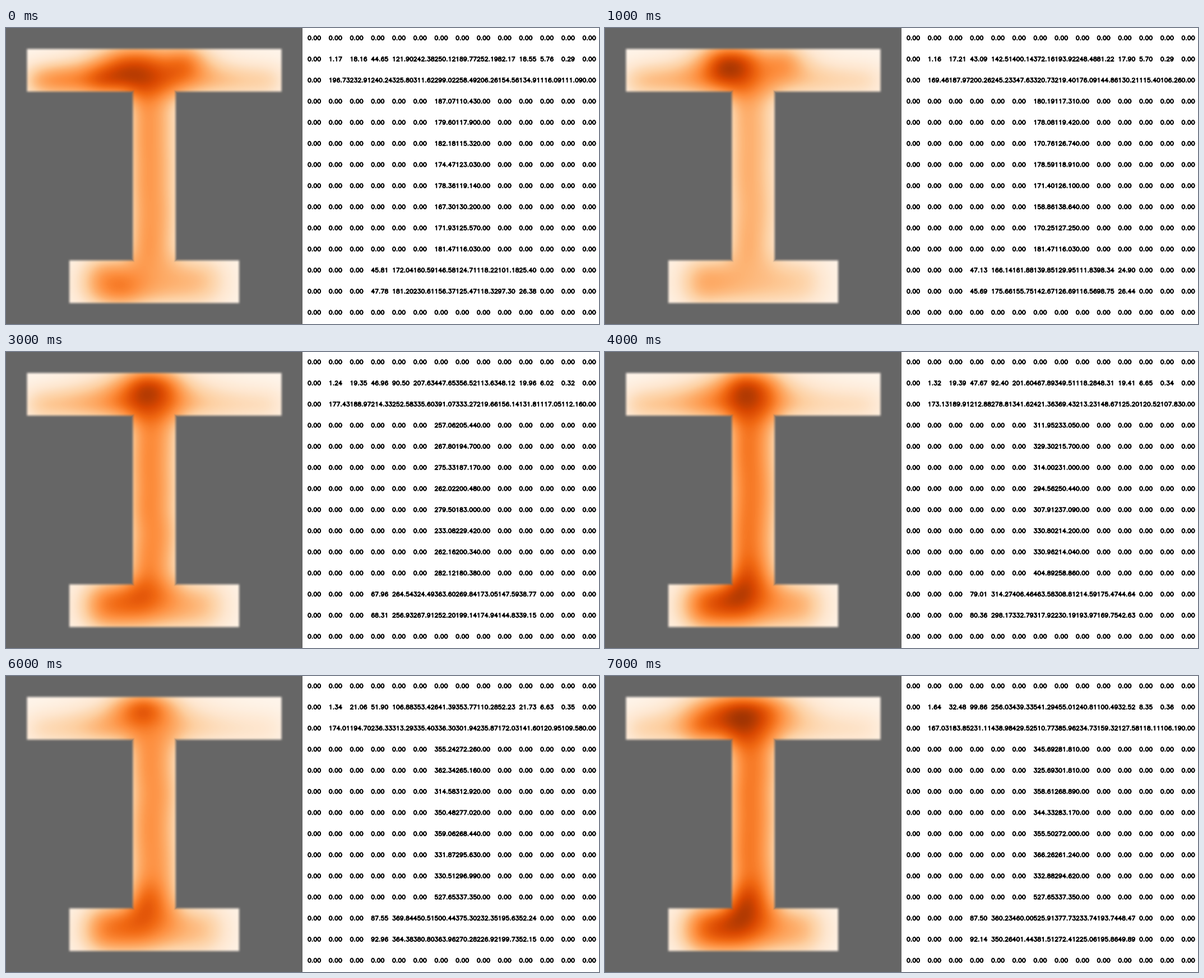
Animation, 1058 px wide and 529 px high, one loop 8000 ms. Source, as a matplotlib script:

```python
import numpy as np
import matplotlib.pyplot as plt
from matplotlib.animation import FuncAnimation
from matplotlib.patches import PathPatch
from matplotlib.path import Path

W, H, DPI = 1058, 529, 100
N = 14
CELL = H / N
STEPS = 8
GLYPH = 0.345              # pixels per glyph unit
TEXT_X, TEXT_Y, PITCH = 538.0, 21.3, 37.73


# ---- Stroke digits on a 20 x 21 unit cell ----

def arc(cx, cy, rx, ry, start, stop, n=15):
    a = np.radians(np.linspace(start, stop, n))
    return list(zip(cx + rx * np.cos(a), cy + ry * np.sin(a)))


SIX = arc(11, 9, 7, 12, 45, 180, 8) + arc(10.5, 6.5, 6.5, 6.5, 180, 540)
STROKES = {
    "0": arc(10, 10.5, 7, 10.5, 0, 360, 19),
    "1": [(6, 17), (8, 18), (11, 21), (11, 0)],
    "2": arc(10, 15, 6, 6, 170, -40) + [(3, 0), (17, 0)],
    "3": [(5, 21), (16, 21), (10, 13)] + arc(10, 6.5, 7, 6.5, 90, -160),
    "4": [(13, 0), (13, 21), (3, 7), (18, 7)],
    "5": [(15, 21), (5, 21), (4, 12)] + arc(10, 7, 7, 7, 140, -155),
    "6": SIX,
    "7": [(3, 21), (17, 21), (7, 0)],
    "8": arc(10, 16.5, 6, 4.5, -90, 270) + arc(10, 6, 7, 6, 90, 450),
    "9": [(20 - x, 21 - y) for x, y in SIX],
    ".": [(5, 0), (5, 2)],
}
GLYPHS = {ch: np.array(pts, float) * (GLYPH, -GLYPH)
          for ch, pts in STROKES.items()}


def grid_path(grid):
    """One path holding every number of the table."""
    verts, codes = [], []
    for (row, col), value in np.ndenumerate(grid):
        x, y = TEXT_X + PITCH * col, TEXT_Y + PITCH * row
        for ch in f"{value:.2f}":
            pts = GLYPHS[ch]
            verts.append(pts + (x, y))
            codes += [Path.MOVETO] + [Path.LINETO] * (len(pts) - 1)
            x += GLYPH * (10 if ch == "." else 20)
    path = Path(np.vstack(verts), codes)
    path.should_simplify = False
    return path


# ---- Forces in the cells of the I section ----

KEY_TIMES = [0, 1, 3, 5, 6, 7]


def key(t, *values):
    return np.interp(t, KEY_TIMES, values)


def bump(cols, center, force, width):
    return force * np.exp(-0.5 * ((cols - center) / width) ** 2)


def section(t):
    """Cell forces at step t: hot spots over a base that grows with load."""
    rng = np.random.default_rng(20 + t)
    load = np.clip((t - 1) / 4, 0, 1)
    early = max(0, 1 - t)
    grid = np.zeros((N, N))

    # Top flange: a crown over the web, with a side spot while load is low
    cols = np.arange(1, 13)
    crown = key(t, 5.4, 5.4, 6.3, 6.3, 6, 6)
    top = bump(cols, 6, 130 + 25 * load, 2)
    top += bump(cols, crown, key(t, 150, 335, 350, 330, 500, 380),
                key(t, 0.9, 0.75, 0.75, 0.75, 0.75, 1.5))
    top += bump(cols, 8, 170 * max(0, 1 - 2 * load), 0.6)
    top[[0, -1]] *= 0.2
    under = 170 - 5 * cols + bump(cols, 5.5, 110, 2)
    under += bump(cols, crown, key(t, 50, 120, 150, 230, 85, 250),
                  key(t, 2, 0.6, 1.1, 0.8, 2, 1.2))
    under += bump(cols, 4, key(t, 60, 0, 0, 80, 40, 130), 0.5)
    under += bump(cols, 1.7, 50 * early, 0.6)
    grid[1, 1:13], grid[2, 1:13] = top, under

    # Bottom flange: a sloped plateau with a spot below the web
    cols = np.arange(3, 11)
    plateau = (170 - 14 * (cols - 4)) * (1 + 0.95 * load)
    plateau[[0, -1]] *= (0.25, 0.3)
    grid[11, 3:11] = plateau + bump(cols, 5.9, 240 * load ** 0.5, 0.9)
    grid[12, 3:11] = (plateau + bump(cols, 5.5, 110 * load, 0.8)
                      + bump(cols, 5, 70 * early, 0.6))
    grid *= rng.uniform(0.96, 1.04, grid.shape)

    # Web: each row shares its total between two cells
    total = np.full(8, 297.5 + 330 * load)
    total[-1] += 237.5 * max(0, 2 * load - 1)
    share = 0.59 - 0.03 * load + rng.normal(0, 0.025, 8)
    share[-1] = 0.61
    grid[3:11, 6] = total * share
    grid[3:11, 7] = total * (1 - share)
    return grid


steps = [section(t) for t in range(STEPS)]


# ---- Grey surround with soft edges ----

def band(first, last, soft=8.0):
    """Soft 0..1 window over cells first to last."""
    p = np.arange(H) + 0.5
    inside = np.minimum(p - first * CELL, last * CELL - p) + 0.3
    t = np.clip(inside / soft + 0.5, 0, 1)
    return t * t * (3 - 2 * t)


shape = np.maximum.reduce([
    np.outer(band(1, 3), band(1, 13)),
    np.outer(band(1, 13), band(6, 8)),
    np.outer(band(11, 13), band(3, 11)),
])
surround = np.full((H, H, 4), 0.4)
surround[..., 3] = 1 - shape

fig = plt.figure(figsize=(W / DPI, H / DPI), dpi=DPI, facecolor="white")
ax = fig.add_axes([0, 0, 1, 1])
ax.axis("off")

box = (0, H, H, 0)
heat = ax.imshow(steps[0], cmap="Oranges", extent=box, aspect="auto",
                 interpolation="bicubic", interpolation_stage="data")
ax.imshow(surround, extent=box, aspect="auto", interpolation="nearest")
ax.set_xlim(0, W)
ax.set_ylim(H, 0)

numbers = PathPatch(grid_path(steps[0]), fill=False, edgecolor="black",
                    linewidth=1.9 * 72 / DPI, capstyle="round",
                    joinstyle="round", snap=False)
ax.add_patch(numbers)


def update(i):
    grid = steps[i]
    heat.set_data(grid)
    heat.set_clim(0, grid.max())
    numbers.set_path(grid_path(grid))
    return heat, numbers


anim = FuncAnimation(fig, update, frames=STEPS, interval=1000,
                     repeat=True, repeat_delay=0)
plt.show()
```
